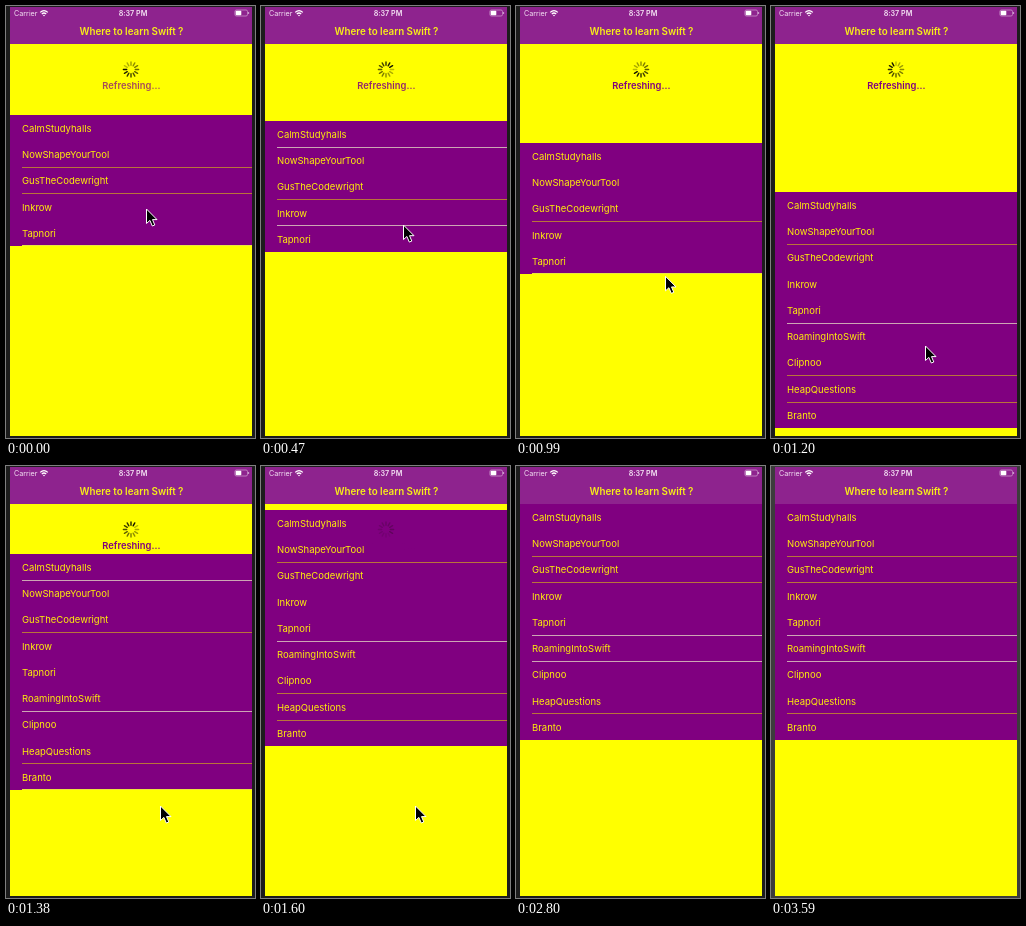
Recreate the animation shown at these times as an HTML page. Size 249 px wide and 432 px high, loop 3.69 s.

```html
<!DOCTYPE html>
<html lang="en">
<head>
<meta charset="utf-8">
<title>Pull to refresh</title>
<style>
  html, body { margin: 0; width: 100%; height: 100%; overflow: hidden; background: #1c1c1c; }
  svg { display: block; width: 249px; height: 432px; }
  text { font-family: Inter, Roboto, sans-serif; }
  .row { font-size: 9.5px; fill: #ffee08; }
  .bold { font-weight: 600; }
  .status { font-size: 7.2px; fill: #f6e6f6; }
  .mid { text-anchor: middle; }
  #bezel { animation: flash 3690ms step-end infinite; }
  @keyframes flash { 0% { fill: #1c1c1c; } 97.29% { fill: #3c3c3c; } }
</style>
</head>
<body>
<svg viewBox="0 0 249 432">
  <rect id="bezel" width="249" height="432" fill="#1c1c1c"/>
  <rect x="4" y="1" width="242" height="429" fill="#ff0"/>
  <g id="table">
    <rect id="panel" x="4" width="242" fill="#800080" shape-rendering="crispEdges"/>
    <g id="labels"></g>
    <g id="lines" shape-rendering="crispEdges"></g>
  </g>
  <text id="note" class="bold mid" x="125.3" y="83.3" font-size="9.4" fill="#800080">Refreshing...</text>
  <g id="spinner" transform="translate(125 63.5)" stroke="#111100" stroke-width="1.4" stroke-linecap="round"></g>

  <rect x="4" y="1" width="242" height="37" fill="#8e238e"/>
  <text class="status" x="8" y="9.6">Carrier</text>
  <g fill="none" stroke="#fff" stroke-width="1.3">
    <path d="M34.2 6.4Q38 2.8 41.8 6.4M35.8 8.1Q38 6 40.2 8.1"/>
    <circle cx="38" cy="9.5" r=".5" fill="#fff" stroke-width=".6"/>
  </g>
  <text class="status bold mid" x="127" y="9.6">8:37 PM</text>
  <rect x="228.9" y="4" width="12.6" height="6" rx="1.5" fill="none" stroke="#d0a0d0" stroke-width=".7"/>
  <rect x="229.7" y="4.8" width="5.6" height="4.4" rx=".7" fill="#fff"/>
  <path d="M242.6 6v2" stroke="#d0a0d0"/>
  <text class="bold mid" x="125.5" y="29" font-size="9.8" fill="#f8ee18">Where to learn Swift ?</text>

  <path id="cursor" d="M0 0V14.5L3.4 11.4L5.8 17L8.3 16L6 10.6H10.5Z" fill="#000" stroke="#fff" stroke-width="1" stroke-linejoin="round"/>
  <path d="M0 430H249V432H0Z" fill="#1c1c1c" style="animation: flash 3690ms step-end infinite"/>
</svg>
<script>
const LOOP = 3690, PITCH = 26.22, REST = 38.3, PEAK = 187;
const RELEASE = 1194, RELOAD = 1060;
const names = ['CalmStudyhalls', 'NowShapeYourTool', 'GusTheCodewright', 'Inkrow', 'Tapnori',
  'RoamingIntoSwift', 'Clipnoo', 'HeapQuestions', 'Branto'];

const drag = [[50, 109.35], [470, 115], [560, 118], [990, 137], [1050, 152], [1110, 175], [1165, PEAK]];
const pointer = [[50, 140.5, 203], [470, 142.5, 219], [560, 143.5, 226], [990, 149.5, 270],
  [1050, 151, 290], [1110, 153.5, 318], [1170, 154.5, 340], [2050, 154.5, 340], [2160, 165, 365],
  [2300, 181, 393], [2430, 193, 410], [2580, 200.5, 419], [2830, 203, 434]];

const $ = id => document.getElementById(id);
const clamp = v => Math.max(0, Math.min(1, v));
const frac = v => v - Math.floor(v);

function add(parent, tag, attrs) {
  const el = document.createElementNS('http://www.w3.org/2000/svg', tag);
  set(el, attrs);
  return $(parent).appendChild(el);
}
function set(el, attrs) {
  for (const key in attrs) el.setAttribute(key, attrs[key]);
}

// linear interpolation of column c between timed keys
function track(keys, t, c) {
  let i = 1;
  while (i < keys.length - 1 && t > keys[i][0]) i++;
  const a = keys[i - 1], b = keys[i];
  return a[c] + (b[c] - a[c]) * clamp((t - a[0]) / (b[0] - a[0]));
}

// finger drag, then a critically damped return
function tableTop(t) {
  if (t < RELEASE) return track(drag, t, 1);
  const w = 0.0122 * (t - RELEASE);
  return REST + (PEAK - REST) * (1 + w) * Math.exp(-w);
}

const rows = names.map((name, i) => {
  const label = add('labels', 'text', { class: 'row', x: 16 });
  label.textContent = name;
  const line = add('lines', 'rect', { x: 16, width: 230, height: 1 });
  return { label, line };
});
const spokes = Array.from({ length: 12 }, (_, i) =>
  add('spinner', 'path', { d: 'M0 -4.3V-7.6', transform: `rotate(${i * 30})` }));

function drawTable(t) {
  const top = tableTop(t), y0 = Math.floor(top);
  const count = t < RELOAD ? 5 : 9;
  set($('panel'), { y: y0, height: Math.floor(top + count * PITCH) - y0 });
  rows.forEach(({ label, line }, i) => {
    const shown = i < count, k = i + 1;
    set(label, { y: y0 + 17 + i * PITCH, visibility: shown ? 'visible' : 'hidden' });
    // hairlines drop out depending on where they fall between pixels
    const lit = shown && frac(0.38 * i - 0.22 + top) > 0.44;
    const last = k === count;
    set(line, {
      y: Math.floor(top + k * PITCH - (last ? 1 : 0.2)),
      fill: last ? '#ece640' : k % 5 === 2 || k % 5 === 3 ? '#b9743a' : '#cda6b4',
      visibility: lit ? 'visible' : 'hidden'
    });
  });
}

function drawSpinner(t) {
  const fade = clamp((1680 - t) / 280);
  const head = 9 + Math.floor(t * 12 / 1000);
  spokes.forEach((s, i) => set(s, { opacity: 1 - 0.065 * ((head - i + 240) % 12) }));
  set($('spinner'), { opacity: fade });
  set($('note'), { opacity: fade * (0.7 + 0.3 * clamp(t / 990)) });
}

function draw() {
  const t = performance.now() % LOOP;
  drawTable(t);
  drawSpinner(t);
  set($('cursor'), {
    transform: `translate(${track(pointer, t, 1)} ${track(pointer, t, 2)})`,
    visibility: t < 2830 ? 'visible' : 'hidden'
  });
  requestAnimationFrame(draw);
}
draw();
</script>
</body>
</html>
```
